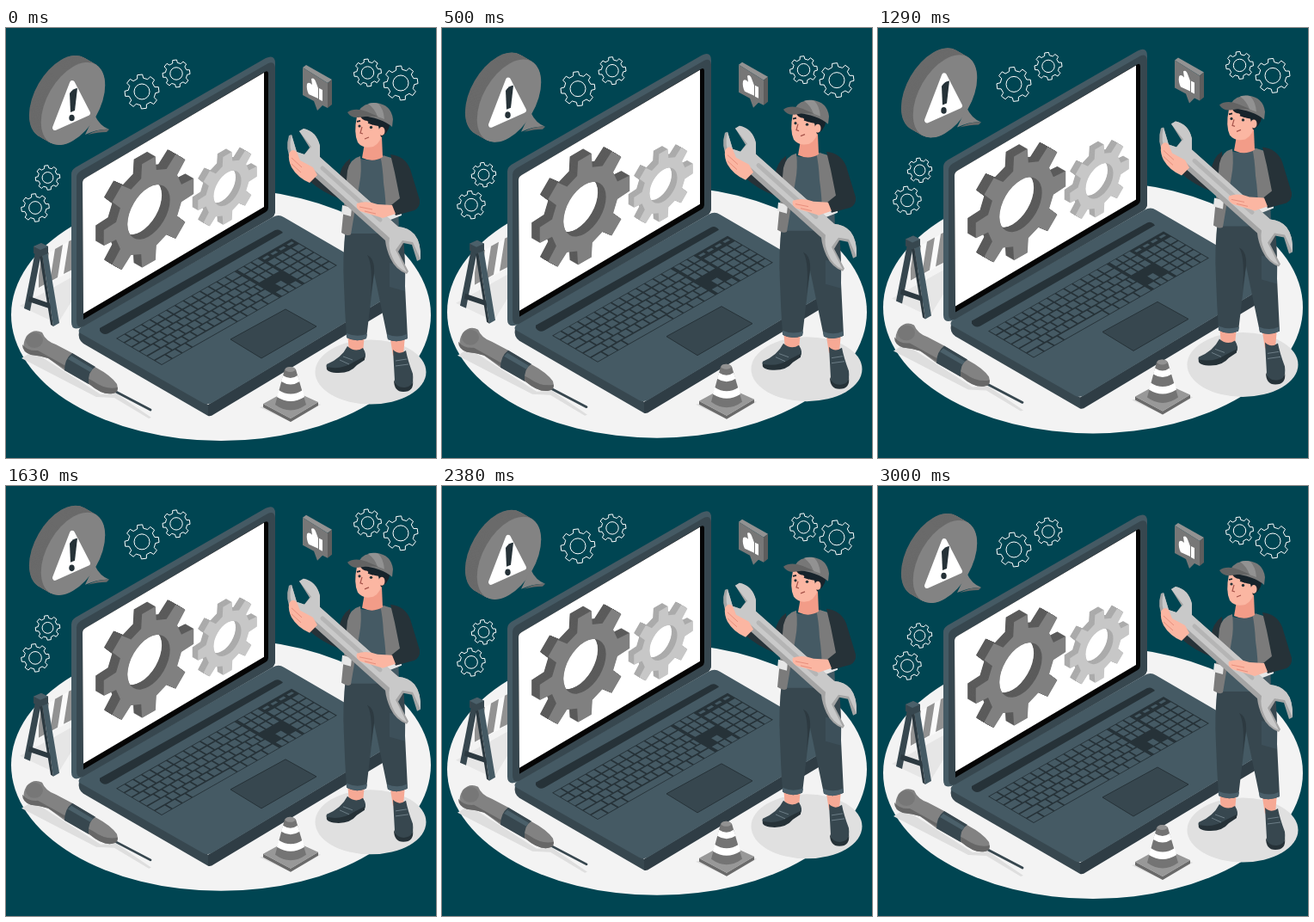
Animation of 500x500 px, one loop 3.04 s. Source, as an HTML page:

```html
<!DOCTYPE html>
<html lang="en">
<head>
<meta charset="utf-8">
<title>Laptop repair</title>
<style>
html, body { margin: 0; width: 100%; height: 100%; overflow: hidden; background: #004552; }
svg { display: block; width: 100%; height: 100%; }
</style>
</head>
<body>
<svg viewBox="0 0 500 500">
<g id="scene">
  <ellipse cx="250" cy="333.5" rx="244" ry="146.500" fill="#f3f3f3"/>
  <ellipse cx="424" cy="400" rx="64.500" ry="37.500" fill="#e0e0e0"/>
  <g id="outlines" fill="none" stroke="#fff" stroke-width="1" stroke-linejoin="round"></g>

  <g id="bubble">
    <g id="disc"></g>
    <path d="M92 124Q108 117 120 118Q109 114 103 101Z" fill="#838383"/>
    <path d="M95 124Q108 117 120 118L117 121Q107 121 95 124Z" fill="#6a6a6a"/>
    <path d="M77 64L95 99L57 116Z" fill="#fff" stroke="#fff" stroke-width="6" stroke-linejoin="round"/>
    <path d="M74 76Q78 70 83 70L80 96L75 98Z" fill="#263238"/>
    <ellipse cx="76.500" cy="104.500" rx="3.200" ry="3.800" fill="#263238"/>
  </g>

  <g id="like">
    <path d="M345 46L349 43L379 60L374 64Z" fill="#929292"/>
    <path d="M374 64L379 60V89L374 93Z" fill="#5d5d5d"/>
    <path d="M345 46L374 64V93L368 90L362 96L358 85L345 78Z" fill="#777"/>
    <path d="M364 70L368 72V85L364 83ZM350 65Q352 62 356 66L355 59Q358 57 360 62L363 70V82L352 77Q349 71 350 65Z" fill="#fff"/>
  </g>

  <g id="barrier">
    <path d="M16 323L40 310L76 290V318L60 344Z" fill="#e6e6e6"/>
    <path d="M38 268L77 246V282L38 303Z" fill="#fafafa"/>
    <path d="M41 266L50 261L45 298L38 302V288ZM57 257L66 252L60 290L51 295ZM73 248L77 246V281L67 286Z" fill="#929292"/>
    <path d="M34 260L41 262L28 329L21 326Z" fill="#37474f"/>
    <path d="M27 312L56 322V328L26 318Z" fill="#2c3940"/>
    <path d="M42 262L48 259L62 343L55 347Z" fill="#455a64"/>
    <path d="M42 262L55 347L52 345L39 266Z" fill="#2c3940"/>
    <path d="M32 254L41 250L49 254V262L40 266L32 262Z" fill="#37474f"/>
    <path d="M32 254L41 250L49 254L40 258Z" fill="#4b606a"/>
  </g>

  <g id="laptop">
    <path d="M85 353L235 438V451L90 367Q83 362 85 353Z" fill="#37474f"/>
    <path d="M235 438L455 306V321L242 449Q238 452 235 451Z" fill="#2f3d45"/>
    <path d="M85 354Q83 350 90 346L310 220Q317 216 323 220L452 295Q459 301 452 308L241 435Q235 439 229 436Z" fill="#455a64"/>
    <path d="M76 170Q76 165 81 162L302 35Q313 30 313 41V213Q313 218 308 221L90 347Q76 354 76 342Z" fill="#455a64"/>
    <path d="M82 174Q82 169 87 166L305 41Q312 38 313 46V213Q313 218 308 221L90 347Q82 350 82 340Z" fill="#37474f"/>
    <path d="M89 180Q89 176 93 174L301 51Q305 49 305 53V209Q305 212 302 214L90 339Z" fill="#050505"/>
    <path d="M89 180Q89 176 93 174L300 52V208L90 332Z" fill="#fff"/>
    <g id="screen"></g>
    <path d="M109 349L313 235Q318 233 322 238L119 355Q113 358 109 352Z" fill="#263238"/>
    <g id="keys" transform="matrix(9.714 -5.524 8.833 5.167 128 361)"></g>
    <path d="M261 362L325 327L361 347L297 384Z" fill="#37474f" stroke="#263238"/>
  </g>

  <g id="driver">
    <path d="M18 384L31 376L110 426L128 425L169 453L166 454L126 430L105 429Z" fill="#dedede"/>
    <path d="M126 422L168 444" stroke="#37474f" stroke-width="2.800" stroke-linecap="round"/>
    <path d="M24 358Q32 349 42 354Q46 364 58 368L77 378L105 395Q122 404 129 414Q132 423 124 425Q112 427 98 415L68 398L49 384Q40 381 29 380Q15 374 24 358Z" fill="#828282"/>
    <path d="M19 368Q25 376 37 375L102 411Q116 421 130 418Q130 425 124 425Q112 427 98 415L49 384Q40 381 29 380Q19 377 19 368Z" fill="#676767"/>
    <path d="M77 378L104 394Q95 399 96 414L68 398Q68 385 77 378Z" fill="#37474f"/>
    <path d="M76 381L101 396L98 400L72 385Z" fill="#4b606a"/>
    <ellipse cx="33" cy="363" rx="10" ry="9" fill="#777"/>
  </g>

  <g id="cone">
    <path d="M295 441L331 458L366 438L350 430Z" fill="#dedede"/>
    <path d="M299 437L331 454L363 435V439L331 458L299 441Z" fill="#6a6a6a"/>
    <path d="M299 437L330 420L363 435L331 454Z" fill="#989898"/>
    <path d="M324 397Q330 391 337 397L349 438Q331 451 313 438Z" fill="#747474"/>
    <path d="M322 404Q331 410 339 404L341.500 411Q331 418 320 411ZM317 421Q331 430 345 421L347 429Q331 439 315 429Z" fill="#fff"/>
    <ellipse cx="330.500" cy="397" rx="6" ry="3" fill="#929292"/>
  </g>

  <g id="man">
    <!-- ankles and shoes -->
    <path d="M397 354L417 356L415 377L399 377ZM446 356L464 357L462 381L450 381Z" fill="#f6a995"/>
    <path d="M397 370Q406 378 415 372Q420 380 417 385L407 390Q401 400 383 399Q370 397 373 391Q390 384 397 370Z" fill="#37474f"/>
    <path d="M373 394Q390 398 405 388L417 382V386L408 392Q400 402 384 401Q371 400 373 394Z" fill="#263238"/>
    <path d="M450 374Q457 381 465 375Q467 386 473 402Q475 420 463 421Q452 422 452 410Z" fill="#37474f"/>
    <path d="M451 409Q454 419 464 418Q473 417 473 409Q475 423 462 423Q451 423 451 409Z" fill="#263238"/>
    <path d="M392 382L403 386M388 386L399 391M453 387L466 385M453 393L468 391" stroke="#6c7d86" fill="none"/>
    <!-- trousers -->
    <path d="M395 232H461Q465 270 464 300L467 361Q455 367 444 362L428 285L419 361Q407 366 396 360Q394 330 393 300Q391 265 395 232Z" fill="#37474f"/>
    <path d="M428 285Q429 268 420 264Q427 275 424 312Z" fill="#2d3a41"/>
    <path d="M446 273L461 277L464 287V306L446 301Z" fill="#3d505a"/>
    <path d="M396 355Q407 360 420 356L419 361Q407 366 396 360ZM443 356Q455 361 466 356L467 361Q455 367 444 362Z" fill="#4a5f6a"/>
    <!-- far arm -->
    <path d="M400 152Q389 159 387 176L361 164L352 177Q367 191 389 199Q398 197 402 176Z" fill="#263238"/>
    <!-- torso -->
    <path d="M409 151Q424 157 440 148L455 162L457 239H394Z" fill="#455a64"/>
    <path d="M412 149Q400 152 397 166L390 238Q398 243 401 240L411 181Q414 166 412 149ZM435 148Q449 149 456 157L459 216L442 224Q442 200 439 180Q438 160 435 148Z" fill="#7b7b7b"/>
    <path d="M391 206L402 209L401 219L390 216ZM441 217L460 210V218L442 225Z" fill="#e6e6e6"/>
    <!-- head -->
    <path d="M417 134L437 126L438 150Q427 157 414 151Z" fill="#f29c88"/>
    <path d="M408 103Q418 98 436 105L438 118Q437 133 427 138Q415 141 409 133Q404 122 408 103Z" fill="#fbb6a2"/>
    <path d="M411 101H446Q449 113 442 122L436 127L433 114Q424 113 420 108Q414 108 411 101Z" fill="#17232b"/>
    <ellipse cx="437" cy="120" rx="3.500" ry="5" fill="#fbb6a2"/>
    <path d="M408 109L412 108M421 110L427 112" stroke="#17232b" stroke-width="1.800"/>
    <path d="M414 115L412 122L415 123M417 129L422 127" fill="none" stroke="#a5534a" stroke-width="1.200"/>
    <circle cx="411" cy="114" r="1.600" fill="#263238"/>
    <circle cx="424.500" cy="115.500" r="1.700" fill="#263238"/>
    <path d="M410 97Q415 87 430 87Q448 89 450 106L449 115Q438 105 410 101Z" fill="#777"/>
    <path d="M421 88Q428 86 433 88Q439 94 440 106L432 103Q429 94 421 88Z" fill="#929292"/>
    <path d="M397 98Q405 92 419 97L433 103Q421 102 410 104Q401 105 397 98Z" fill="#636363"/>
    <!-- wrench -->
    <path d="M346 117Q361 120 365 137L365 150L456 231Q468 232 475 240Q483 250 482 269L478 271L472 252L462 250L456 260L468 283L466 286Q453 281 447 268Q442 257 441 247L352 167Q341 165 332 154Q324 141 329 125L332 124L338 144L347 147L353 139L341 120Z" fill="#a5a5a5"/>
    <path d="M346 117Q361 120 365 137L365 150L456 231Q468 232 475 240Q483 250 482 269L473 249L461 247L453 258L466 284Q454 279 449 266Q444 255 446 244L356 163Q344 163 335 152Q328 140 332 124L338 144L347 147L355 138L341 120Z" fill="#c9c9c9"/>
    <path d="M368 163L435 223" stroke="#b5b5b5" stroke-width="5" stroke-linecap="round"/>
    <!-- hands and near arm -->
    <path d="M329 146Q333 139 338 144L342 154L357 162L362 171L353 180Q339 174 332 162Q328 154 329 146Z" fill="#fbb6a2"/>
    <path d="M332 151L344 162M332 158L343 168" stroke="#e88f7d" fill="none"/>
    <path d="M447 147Q464 149 470 164L481 200Q482 208 475 212L453 218L448 206L458 198L452 168Z" fill="#263238"/>
    <path d="M408 204Q419 200 432 205L449 206L453 216L438 221Q422 216 412 213Q406 209 408 204Z" fill="#fbb6a2"/>
    <path d="M411 208L426 211M417 213L430 216" stroke="#e88f7d" fill="none"/>
  </g>
</g>
</svg>
<script>
const $ = id => document.getElementById(id);

// Closed outline of a cog, with a round hole
function cog(R, root, hole, turn = 0, teeth = 8) {
  const step = 2 * Math.PI / teeth, pts = [];
  for (let i = 0; i < teeth; i++)
    for (const [k, r] of [[-.29, root], [-.19, R], [.19, R], [.29, root]]) {
      const a = turn + (i + k) * step;
      pts.push([r * Math.cos(a), r * Math.sin(a)].map(v => v.toFixed(2)));
    }
  return `M${pts.join('L')}ZM${hole} 0A${hole} ${hole} 0 1 0 ${-hole} 0A${hole} ${hole} 0 1 0 ${hole} 0Z`;
}

// Thick flat shape lying in the plane of the screen
function solid(d, x, y, depth, face, side) {
  const layer = (k, fill) => `<path d="${d}" fill="${fill}" fill-rule="evenodd"
    transform="matrix(.866 -.5 0 1 ${x - .866 * k} ${y - .5 * k})"/>`;
  let out = '';
  for (let k = depth; k > 0; k -= .5) out += layer(k, side);
  return out + layer(0, face);
}

$('outlines').innerHTML = [
  [158, 74, 20], [198, 53, 16], [420.5, 52, 16], [459, 64, 20], [48.5, 174, 14.3], [34, 209, 16.3]
].map(([x, y, r]) => `<path d="${cog(r, r * .79, r * .45, -.12)}" transform="translate(${x} ${y})"/>`).join('');

$('screen').innerHTML =
  solid(cog(40, 29.5, 18.5), 257.5, 186.5, 7.5, '#c7c7c7', '#ababab') +
  solid(cog(61, 45, 28.5), 166, 214, 11, '#808080', '#5b5b5b');

$('disc').innerHTML = solid('M43 0A43 43 0 1 0 -43 0A43 43 0 1 0 43 0Z', 78, 88, 16, '#838383', '#6a6a6a');

let keys = '<rect width="21" height="6" fill="#263238"/>';
const key = (x, y, w = 1, h = 1) =>
  keys += `<rect x="${x + .09}" y="${y + .09}" width="${w - .18}" height="${h - .18}" fill="#455a64"/>`;
for (let row = 0; row < 6; row++) {
  if (row == 5) [1.3, 1.2, 1.2, 5.4, 1.2, 1.2, 1.3, 1.4].reduce((x, w) => (key(x, 5, w), x + w), 0);
  else {
    const lead = [1, 1, 1.4, 1.7, 2.2][row];
    key(0, row, lead);
    for (let x = lead; x < 13; x++) key(x, row, Math.min(1, 14.2 - x));
    const end = lead + Math.ceil(13 - lead);
    if (end < 14) key(end, row, 14.2 - end);
  }
  for (let c = 0; c < 3; c++) if (row < 3 || row == 5 || row == 4 && c == 1) key(14.4 + c * .85, row, .85);
  for (let c = 0; c < 4; c++) row ? key(17.1 + c * .97, row, .97) : key(17.1 + c * .97, .25, .8, .5);
}
$('keys').innerHTML = keys;

// Steady rise and fall, with a short rest before repeating
function draw() {
  const t = Math.min(performance.now() % 3040, 3000);
  const lift = 10 * (1 - Math.abs(t / 1500 - 1));
  $('scene').setAttribute('transform', `translate(0 ${-lift.toFixed(3)})`);
  requestAnimationFrame(draw);
}
draw();
</script>
</body>
</html>
```
